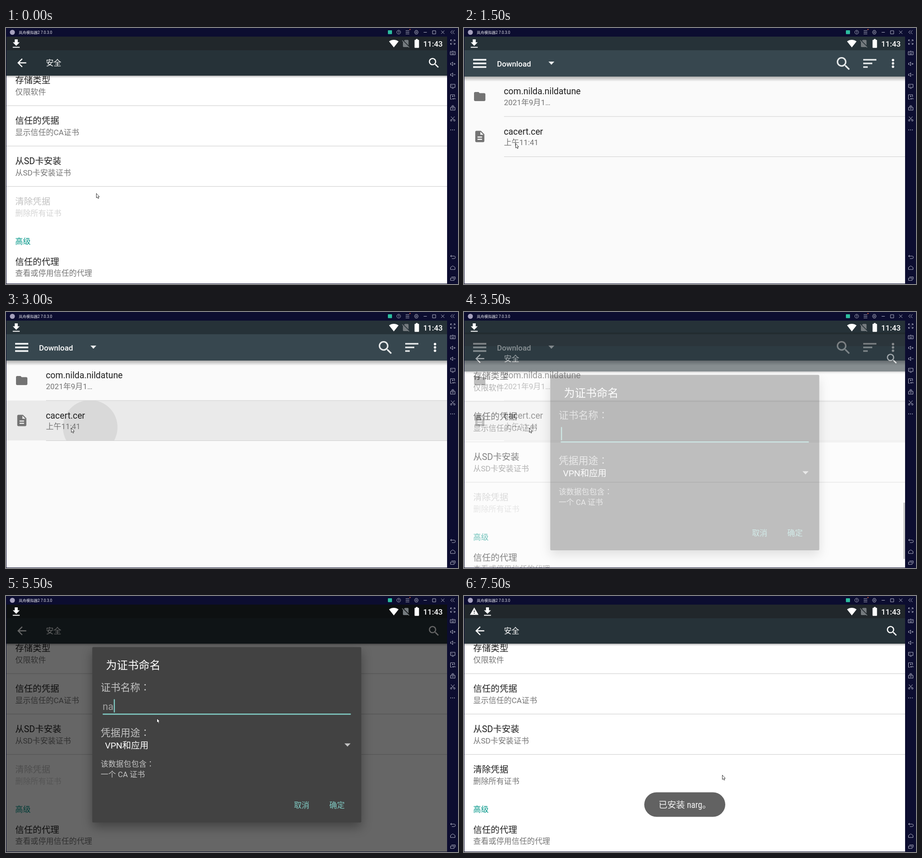
An HTML page with a canvas that plays this animation: 993x564 px, repeating every 8000 ms.

```html
<!DOCTYPE html>
<html lang="zh-CN">
<head>
<meta charset="utf-8">
<title>证书安装</title>
<style>
html, body { margin: 0; width: 100%; height: 100%; overflow: hidden; background: #0c0d30; }
canvas { display: block; width: 993px; height: 564px; }
</style>
</head>
<body>
<canvas id="stage" width="993" height="564"></canvas>
<script>
const W = 993, H = 564, LOOP = 8000, STEP = 500;
const NAME = 'narg';
const SANS = 'Roboto, "Noto Sans CJK SC", "Noto Sans CJK", sans-serif';
const COLON = '"Noto Sans CJK JP", "Noto Sans CJK TC", sans-serif';
const THIN = '"Roboto Condensed", Roboto, "Noto Sans CJK SC", sans-serif';
const NAVY = '#0c0d30', TEAL = '#80cbc4', PALE = '#c3c3c3';

const main = document.getElementById('stage').getContext('2d');
const spare = document.createElement('canvas');
spare.width = W;
spare.height = H;
const layer = spare.getContext('2d');
let g = main;

const ICON = {
  back: 'M20 11H7.83l5.59-5.59L12 4l-8 8 8 8 1.41-1.41L7.83 13H20v-2z',
  search: 'M15.5 14h-.79l-.28-.27C15.41 12.59 16 11.11 16 9.5 16 5.91 13.09 3 9.5 3S3 5.91 3 9.5 5.91 16 9.5 16c1.61 0 3.09-.59 4.23-1.57l.27.28v.79l5 4.99L20.49 19l-4.99-5zm-6 0C7.01 14 5 11.99 5 9.5S7.01 5 9.5 5 14 7.01 14 9.5 11.99 14 9.5 14z',
  save: 'M19 9h-4V3H9v6H5l7 7 7-7zM5 18v2h14v-2H5z',
  warn: 'M1 21h22L12 2 1 21zm12-3h-2v-2h2v2zm0-4h-2v-4h2v4z',
  folder: 'M10 4H4c-1.1 0-1.99.9-1.99 2L2 18c0 1.1.9 2 2 2h16c1.1 0 2-.9 2-2V8c0-1.1-.9-2-2-2h-8l-2-2z',
  doc: 'M14 2H6c-1.1 0-1.99.9-1.99 2L4 20c0 1.1.89 2 1.99 2H18c1.1 0 2-.9 2-2V8l-6-6zm2 16H8v-2h8v2zm0-4H8v-2h8v2zm-3-5V3.5L18.5 9H13z',
  wifi: 'M12 21.5L23.64 7c-.45-.34-4.93-4-11.64-4C5.28 3 .81 6.66.36 7z',
  noSim: 'M19 5c0-1.1-.9-2-2-2h-7L7.66 5.34 19 16.68zM3.65 3.88L2.38 5.15 5 7.77V19c0 1.1.9 2 2 2h10c.35 0 .67-.1.96-.26l1.88 1.88 1.27-1.27z',
  battery: 'M15.67 4H14V2h-4v2H8.33C7.6 4 7 4.6 7 5.33v15.33C7 21.4 7.6 22 8.33 22h7.33c.74 0 1.34-.6 1.34-1.33V5.33C17 4.6 16.4 4 15.67 4z'
};

// Thin outline icons, centred on 0,0.
const SIDE = [
  [31, 'M-2-5H-5V-2M2-5H5V-2M-5 2V5H-2M5 2V5H2M-5-5L-1.5-1.5M5-5L1.5-1.5M-5 5L-1.5 1.5M5 5L1.5 1.5'],
  [55, 'M-5.5-3H5.5V4H-5.5ZM-3.5-.5H-2M-.8-.5H.8M2-.5H3.5M-2.5 2H2.5M0-3V-5'],
  [79, 'M-5-1.5H-3L0-4V4L-3 1.5H-5ZM2 0H6M4-2V2'],
  [103, 'M-5-1.5H-3L0-4V4L-3 1.5H-5ZM2 0H6'],
  [128, 'M-5-4H5V3H-5ZM-2 5H2M-3-1.5L-1-.5'],
  [152, 'M4 0V-5H-5V5H-2M-1.5-1.5H1.5M0-3V0M0 3H1V5H0ZM3 5V3H4.5M5.5 3V5'],
  [176, 'M-5-1H5V5H-5ZM-3.5-3H3.5M-2-5H2M-2 2H2'],
  [200, 'M-4-5L2.5 2.5M4-5L-2.5 2.5M-1.8 3.5A1.7 1.7 0 1 1-5.2 3.5A1.7 1.7 0 1 1-1.8 3.5M5.2 3.5A1.7 1.7 0 1 1 1.8 3.5A1.7 1.7 0 1 1 5.2 3.5'],
  [504, 'M-2.5-4L-5-1.5L-2.5 1M-5-1.5H3A2.5 2.5 0 0 1 3 4H-2'],
  [528, 'M-5 4V-.5L0-4L5-.5V4Z'],
  [552, 'M-5-1H3V4H-5ZM-3-3.5H5.5V2']
];

function rect(x, y, w, h, color) {
  g.fillStyle = color;
  g.fillRect(x, y, w, h);
}

function round(x, y, w, h, r, color) {
  g.fillStyle = color;
  g.beginPath();
  g.roundRect(x, y, w, h, r);
  g.fill();
}

function disc(x, y, r, color) {
  g.fillStyle = color;
  g.beginPath();
  g.arc(x, y, r, 0, Math.PI * 2);
  g.fill();
}

function icon(d, x, y, scale, color) {
  g.save();
  g.translate(x, y);
  g.scale(scale, scale);
  g.fillStyle = color;
  g.fill(new Path2D(d));
  g.restore();
}

function line(d, x, y, color, width = 1) {
  g.save();
  g.translate(x, y);
  g.strokeStyle = color;
  g.lineWidth = width;
  g.stroke(new Path2D(d));
  g.restore();
}

// mid is the vertical centre of a full-width glyph.
function text(s, x, mid, size, color, weight = 400, family = SANS) {
  const y = mid + size * 0.38;
  const colon = s.endsWith('：');
  const body = colon ? s.slice(0, -1) : s;
  g.font = `${weight} ${size}px ${family}`;
  g.fillStyle = color;
  g.fillText(body, x, y);
  if (!colon) return;
  const end = x + g.measureText(body).width;
  g.font = `${weight} ${size}px ${COLON}`;
  g.fillText('：', end, y);
}

function shade(y, h, alpha) {
  const f = g.createLinearGradient(0, y, 0, y + h);
  f.addColorStop(0, `rgba(0,0,0,${alpha})`);
  f.addColorStop(1, 'rgba(0,0,0,0)');
  rect(0, y, 969, h, f);
}

function settings(cleared, scrollbar) {
  const rows = [
    [115, '存储类型', '仅限软件'],
    [204, '信任的凭据', '显示信任的CA证书'],
    [293, '从SD卡安装', '从SD卡安装证书'],
    [382, '清除凭据', '删除所有证书'],
    [514.5, '信任的代理', '查看或停用信任的代理']
  ];
  rect(0, 19, 969, 545, '#fff');
  rows.forEach(([y, head, sub], i) => {
    const off = i === 3 && !cleared;
    text(head, 20.3, y, 19.3, off ? '#c2c2c2' : '#1f1f1f');
    text(sub, 20.3, y + 25.3, 16.9, off ? '#d4d4d4' : '#757575');
  });
  text('高级', 20.3, 470, 16.9, '#009688', 500);
  for (const y of [171, 260, 349]) rect(0, y - 0.5, 969, 1.2, '#d2d2d2');
  if (scrollbar) rect(965, 394, 4, 124, '#aaa');
  shade(105, 5, 0.28);
  rect(0, 19, 969, 30, '#21272b');
  rect(0, 49, 969, 56, '#263238');
  icon(ICON.back, 20.1, 62.2, 1.22, '#fff');
  text('安全', 87.7, 77, 16.9, '#fff', 500);
  icon(ICON.search, 925.3, 62.2, 1.24, '#fff');
}

function triangle(x, y, w, h, color) {
  icon(`M0 0H${w}L${w / 2} ${h}Z`, x, y, 1, color);
}

function files(pressed, ripple) {
  rect(0, 19, 969, 545, '#fafafa');
  if (pressed) rect(0, 195, 969, 88, '#eaeaea');
  if (ripple) {
    g.save();
    g.beginPath();
    g.rect(0, 195, 969, 88);
    g.clip();
    disc(185, 254, 60, '#d9d9d9');
    g.restore();
  }
  for (const y of [194.5, 283]) rect(88, y, 881, 1, '#cfcfcf');
  icon(ICON.folder, 19.5, 136, 1.25, '#737373');
  icon(ICON.doc, 19.7, 224, 1.25, '#737373');
  text('com.nilda.nildatune', 87.5, 139, 19.3, '#1f1f1f');
  text('2021年9月1…', 87.7, 163.4, 16.9, '#757575');
  text('cacert.cer', 87.5, 227.7, 19.3, '#1f1f1f');
  text('上午11:41', 87.7, 252, 16.9, '#757575');
  shade(107, 11, 0.3);
  rect(0, 19, 969, 30, '#263238');
  rect(0, 49, 969, 58, '#37474f');
  for (const y of [70, 78, 86]) rect(20, y - 1.9, 29, 3.8, '#eceff0');
  text('Download', 72.5, 78.6, 16.8, '#fff', 500);
  triangle(185.5, 74, 13, 7, '#eceff0');
  icon(ICON.search, 814, 59, 1.64, '#e6e9ea');
  [29, 20, 10].forEach((w, i) => rect(877, 68.3 + i * 8, w, 3.4, '#e6e9ea'));
  for (const y of [70.7, 78, 85.3]) disc(942.5, y, 2.7, '#fff');
}

function dialog(typed, caret, press) {
  g.save();
  g.shadowColor = 'rgba(0,0,0,.35)';
  g.shadowBlur = 24;
  g.shadowOffsetY = 10;
  round(189.5, 112.5, 591, 386.5, 2.5, '#424242');
  g.restore();
  text('为证书命名', 219.5, 151.7, 24, '#fff');
  text('证书名称：', 208, 201.2, 21.7, PALE);
  if (typed) text(typed, 212.3, 242.7, 21.7, '#a0a0a0');
  if (caret) {
    g.font = `400 21.7px ${SANS}`;
    g.globalAlpha = caret;
    rect(213 + g.measureText(typed).width, 227.5, 2.4, 29, TEAL);
    g.globalAlpha = 1;
  }
  rect(212.5, 259, 545, 2.6, TEAL);
  text('凭据用途：', 208, 300.3, 21.7, PALE);
  text('VPN和应用', 217.5, 328.5, 19.2, '#fff');
  triangle(743.5, 324.7, 13.5, 7, PALE);
  text('该数据包包含：', 208, 369.7, 16.8, PALE);
  text('一个 CA 证书', 208, 392.7, 16.8, PALE);
  if (press) {
    round(693, 438.5, 68, 44, 2, '#4e4e4e');
    disc(728.5, 459, 14.5, '#6a6a6a');
  }
  text('取消', 632.7, 461, 16.9, TEAL, 500);
  text('确定', 710.3, 461, 16.9, TEAL, 500);
}

function toast() {
  round(396, 432.5, 178, 54, 27, '#626262');
  text(`已安装 ${NAME}。`, 427.5, 460, 19.3, '#f4f4f4', 400, THIN);
}

function statusIcons(warned) {
  if (warned) icon(ICON.warn, 12.2, 23.5, 0.86, '#fff');
  icon(ICON.save, warned ? 38.5 : 9.4, 21.8, 1.09, '#fff');
  icon(ICON.wifi, 841.2, 23.3, 0.9, '#fff');
  icon(ICON.noSim, 867.6, 23.5, 0.88, '#757b7f');
  icon(ICON.battery, 890.7, 22.2, 0.98, '#fff');
  text('11:43', 916.5, 34.2, 16.9, '#fff', 500);
}

function chrome() {
  const ink = '#b4b6c8';
  rect(0, 0, W, 19, NAVY);
  rect(969, 0, 24, H, NAVY);
  rect(0, 0, 1, H, NAVY);
  rect(0, 563, W, 1, NAVY);
  disc(14, 9.5, 5.5, '#a5a0bd');
  text('岚舟模拟器2 7.0.3.0', 28, 9.5, 8.3, '#eeeef4');
  round(839, 5, 9, 8.5, 1, '#2cbd9f');
  line('M4.2 0A4.2 4.2 0 1 1-4.2 0A4.2 4.2 0 1 1 4.2 0M-1.3-1A1.3 1.3 0 1 1 0 .5V1.2M0 2V2.8', 862.7, 9.2, ink, 0.9);
  line('M-4-3.5H4M-4 0H4M-4 3.5H4', 882, 9.5, ink);
  disc(887.5, 3.3, 1.2, '#d8623c');
  line('M-2-4H2L4.2 0L2 4H-2L-4.2 0ZM1.5 0A1.5 1.5 0 1 1-1.5 0A1.5 1.5 0 1 1 1.5 0', 901.5, 9.3, ink);
  line('M-3.5 0H3.5', 921, 9.5, ink);
  line('M-3.5-3.5H3.5V3.5H-3.5Z', 940.5, 9.5, ink);
  line('M-3.5-3.5L3.5 3.5M3.5-3.5L-3.5 3.5', 959.5, 9.3, ink);
  line('M-.5-4L-4.5 0L-.5 4M4-4L0 0L4 4', 981.3, 9.2, ink);
  for (const [y, d] of SIDE) line(d, 981.5, y, ink);
  for (const x of [977, 981, 985]) disc(x, 224.5, 0.9, ink);
}

function pointer([x, y]) {
  const p = new Path2D('M.5 .5V10.2L2.7 8.3L4.2 11.8L5.9 11L4.4 7.8H7.2Z');
  g.save();
  g.translate(x, y);
  g.fillStyle = '#fff';
  g.fill(p);
  g.lineWidth = 0.9;
  g.strokeStyle = '#222';
  g.stroke(p);
  g.restore();
}

// Paints a whole window on its own sheet, then lays it down faded and shifted.
function fade(paint, alpha, dy) {
  layer.clearRect(0, 0, W, H);
  g = layer;
  paint();
  g = main;
  g.globalAlpha = alpha;
  g.drawImage(spare, 0, dy);
  g.globalAlpha = 1;
}

// [from ms, x, y]
const PATH = [
  [0, 198, 364], [500, 150, 328], [1000, 114, 290], [1500, 113, 254],
  [2000, 149, 246], [2500, 143, 255], [4000, 331, 269],
  [6500, 730, 457], [7500, 567, 394]
];
const TYPING = [[5000, 0], [5500, 2], [6000, 4]];

const latest = (keys, t) => keys.filter(k => k[0] <= t).pop();

function draw(t) {
  const done = t >= 7500;
  g = main;
  g.save();
  g.beginPath();
  g.rect(1, 19, 968, 544);
  g.clip();
  if (t < 1500 || done) {
    settings(done, false);
    if (done) toast();
  } else if (t < 3500) {
    files(t >= 3000, t >= 3000);
  } else if (t < 4000) {
    files(true, false);
    fade(() => settings(false, true), 0.54, 26);
    fade(() => dialog('', 1, false), 0.33, 26);
  } else {
    const typed = NAME.slice(0, (latest(TYPING, t) || [0, 0])[1]);
    const caret = t >= 7000 ? 0.5 : (t / STEP) % 2;
    settings(false, t < 5000);
    rect(0, 19, 969, 545, 'rgba(0,0,0,.6)');
    dialog(typed, caret, t >= 7000);
  }
  statusIcons(done);
  g.restore();
  chrome();
  pointer(latest(PATH, t).slice(1));
}

function tick() {
  const t = performance.now() % LOOP;
  draw(Math.floor(t / STEP) * STEP);
  requestAnimationFrame(tick);
}
tick();
</script>
</body>
</html>
```
